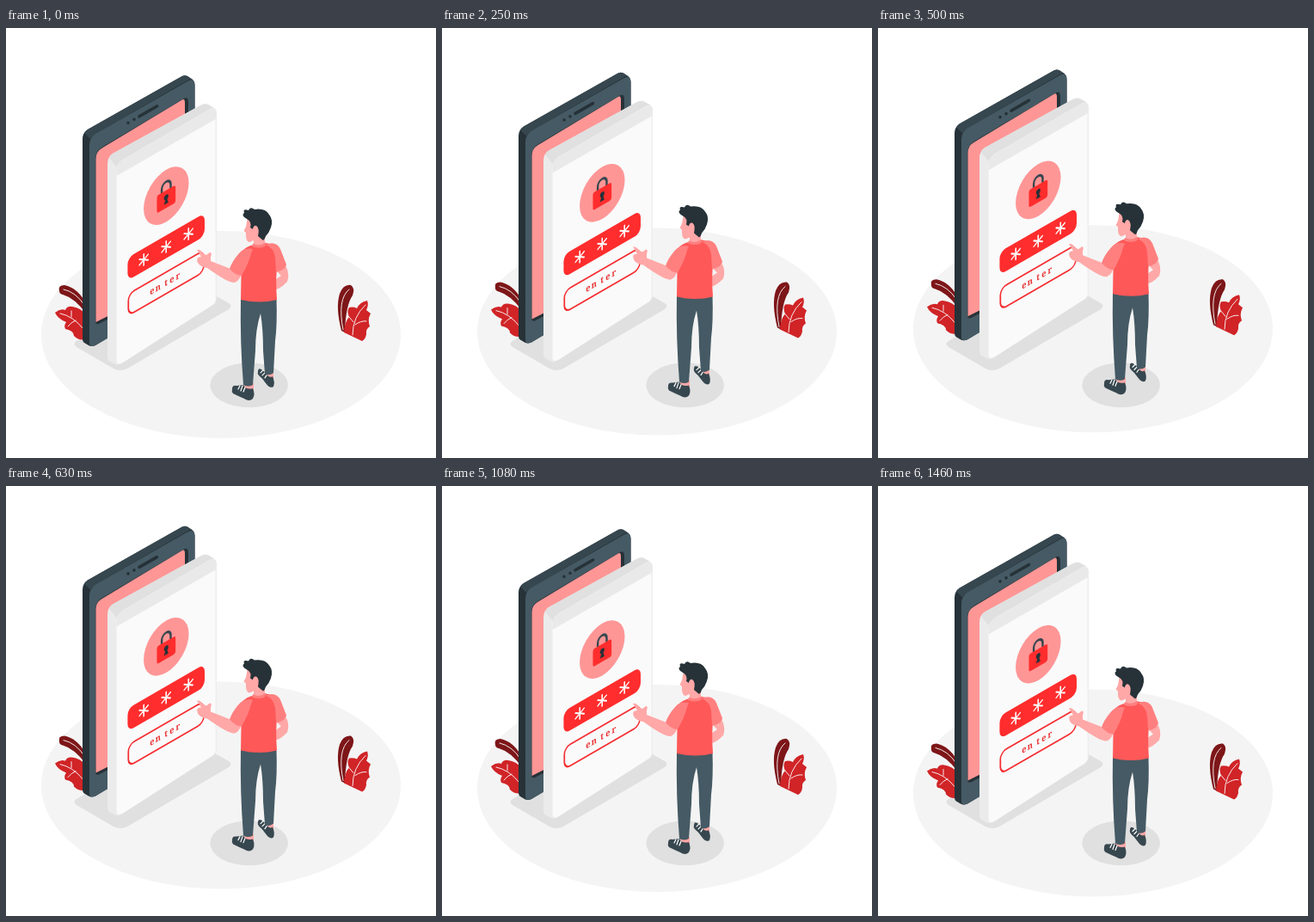
Recreate the animation shown at these times as an HTML page. Size 500 px wide and 500 px high, loop 1500 ms.

```html
<!DOCTYPE html>
<html lang="en">
<head>
<meta charset="utf-8">
<title>Enter password</title>
<style>
  html, body { margin: 0; height: 100%; overflow: hidden; background: #fff; }
  svg { display: block; width: 100vw; height: 100vh; }
  .dark { fill: #263238; }
  .shade { fill: #37474f; }
  .slate { fill: #455a64; }
  .pink { fill: #ff9696; }
  .skin { fill: #ffa8a7; }
  .red { fill: #ff2d2d; }
  .sleeve { fill: #ff7f7f; }
  .shadow { fill: #e0e0e0; }
  .maroon { fill: #7d1618; }
  .leaf { fill: #d02427; }
  .line { fill: none; stroke: #fff; stroke-linecap: round; stroke-linejoin: round; }
</style>
</head>
<body>
<svg viewBox="0 0 500 500">
  <defs>
    <path id="star" class="line" stroke-width="1.8" d="M0-6.500V6.500M-5.800-3.300L5.800 3.300M-5.800 3.300L5.800-3.300"/>
  </defs>

  <ellipse class="float" cx="250" cy="356.5" rx="209" ry="120.5" fill="#f4f4f4"/>

  <path class="shadow" d="M82 364L200 295Q208 291 215 295L259 320Q264 323 259 327L141 396Q133 400 125 396L82 371Q77 367 82 364Z"/>
  <ellipse class="shadow" cx="282.7" cy="415.3" rx="45.3" ry="26"/>

  <g class="float">
    <g id="plants">
      <path class="maroon" d="M62 306Q60 299 68 299Q83 302 93 320V332Q80 314 66 310Q62 309 62 306Z"/>
      <path class="line" stroke-width=".9" d="M67 304Q81 307 91 322"/>
      <path class="leaf" d="M57 331Q63 326 69 328Q71 323 77 324Q86 325 93 333V362Q85 364 79 358Q79 352 69 350Q67 346 70 342Q60 338 57 331Z"/>
      <path class="line" stroke-width=".9" d="M63 332Q78 335 90 350M76 336L76 329M81 340Q76 342 72 347"/>
      <path class="maroon" d="M390 352Q383 325 388 309Q392 298 401 299Q406 302 403 311Q395 322 394 354Z"/>
      <path class="line" stroke-width=".9" d="M399 304Q385 315 392 351"/>
      <path class="leaf" d="M393 354Q394 341 399 336Q396 329 399 325Q404 324 408 326Q411 319 420 317Q422 322 419 328L424 332Q420 339 423 347Q418 350 419 356Q418 362 414 364Z"/>
      <path class="line" stroke-width=".9" d="M403 357Q403 336 418 322M404 342L399 336M406 345Q413 340 419 341"/>
    </g>

    <g id="phone">
      <path class="dark" d="M89 129Q89 122 95 118L203 57Q207 54 211 56L217 60Q219.500 62 219.500 67V300L104 369Q99 371 96 369L91 366Q89 365 89 361Z"/>
      <path class="shade" d="M91 122Q93 119 95 118L203 57Q207 54 211 56L217 60Q214 59 211 61L104 123Q100 126 98 129Z"/>
      <path class="slate" d="M97 136Q97 128 104 123L211 62Q219.500 57 219.500 67V300L104 369Q97 372 97 366Z"/>
      <path class="dark" d="M104 152Q104 144 111 139L207 82Q212 79 212 87V290L108 344Q104 345 104 341Z"/>
      <path class="pink" d="M104.500 152Q104.500 144 111 140L204 84Q208 81 208 87V290L104.500 342Z"/>
      <path class="line" style="stroke:#263238" stroke-width="3.600" d="M142 110.300v.1M149 106.300v.1M155 102.800L175.500 91"/>
    </g>

    <g id="panel">
      <path fill="#ebebeb" d="M118 158Q118 150 124 146L226 90Q231 87 235 89L242 93Q245 95 245 99V314Q245 319 241 322L136 389Q130 393 127 391L121 388Q118 386 118 382Z"/>
      <path fill="#e0e0e0" d="M120 151Q121 148 124 146L226 90Q231 87 235 89L242 93Q239 93 236 95L136 153Q131 156 129 162Z"/>
      <path fill="#fafafa" d="M128.500 167Q128.500 158 136 153L236 95Q244 91 244 99V314Q244 319 240 322L136 389Q128.500 393 128.500 386Z"/>
      <path fill="#e9e9e9" d="M128.500 172V167Q128.500 158 136 153L236 95Q244.500 91 244.500 99V105.500Z"/>
      <path fill="none" stroke="#eee" stroke-width="1.500" d="M244.200 105V314"/>
      <g transform="matrix(.866 -.5 0 1 186.300 195.200)">
        <circle class="pink" r="30.300"/>
        <g transform="translate(0 3.700)">
          <path fill="none" stroke="#37474f" stroke-width="2.800" d="M-6-9V-14.200A6 6 0 0 1 6-14.200V-9"/>
          <rect class="red" x="-12.500" y="-10" width="25" height="20.500" rx="2.500"/>
          <circle class="dark" cy="-2" r="3"/>
          <path class="dark" d="M-1 0H1L3 5.500H-3Z"/>
        </g>
      </g>
      <g transform="matrix(.866 -.5 0 1 186.200 254.500)">
        <rect class="red" x="-51.700" y="-13.300" width="103.400" height="26.600" rx="8"/>
        <use href="#star" x="-30"/><use href="#star"/><use href="#star" x="30"/>
      </g>
      <g transform="matrix(.866 -.5 0 1 186.200 296.500)">
        <rect x="-50.700" y="-12.500" width="101.400" height="25" rx="8" fill="#fafafa" stroke="#f52d31" stroke-width="2"/>
        <text x="-22 -14.300 -8 -2.200 4.800 13.200" y="3.300" font-family="'Noto Serif', serif" font-weight="700" font-size="10.500" fill="#e8302f">en ter</text>
      </g>
    </g>

    <g id="man">
      <path class="skin" d="M277 413H288V422H277ZM301 400H311V409H301Z"/>
      <path class="shade" d="M263 420Q263 415 268 416L276 415Q279 421 287 419Q290 426 287 431Q283 435 277 431Q270 428 264 425Q262 423 263 420ZM293 399Q293 395 297 397L302 401Q306 408 310 405Q313 412 311 417Q307 420 302 413Q298 407 294 404Q292 402 293 399Z"/>
      <path class="line" stroke-width="1.200" d="M272 416L270 420M275 416L273 422M278 418L276 423M299 398L296 401M301 401L298 404M303 404L301 407"/>
      <path class="slate" d="M273 314H314.500Q315.500 345 313 364L311 401Q306 405 301 402L299 375Q299 350 296 332Q290 350 290 375L287 415Q282 418 276 415Q272 365 273 314Z"/>
      <path class="skin" d="M315 283L326 278Q330 287 327 295Q319 303 314 304L313 299Q311 296 314 292L320 288Z"/>
      <path fill="#ff5858" d="M274 260Q279 254 288 252L301 250Q312 251 316 257V270Q313 290 315 316Q295 321 273 316Z"/>
      <path class="sleeve" d="M302 252Q314 247 319 257L326 275Q326 281 314 284L313 267Q312 256 302 252Z"/>
      <path class="skin" d="M222 258Q226 257 229 262L233 264L237 261Q240 261 238 266L238 271L261 280L274 283Q273 293 266 296Q259 297 234 279Q226 278 223 273Q220 266 227 266Q224 261 222 258Z"/>
      <path class="sleeve" d="M287 257Q277 255 271 262Q263 271 260 280Q267 288 274 288Q283 272 285 262Z"/>
      <path class="sleeve" d="M287 251Q295 247 303 250L301 254Q294 257 286 254Z"/>
      <path class="skin" d="M281 220L279 231L276.500 236L279 238V241Q279 248 283 249L288 247V251Q294 254 301 250V238L296 222Z"/>
      <path class="dark" d="M277 220Q274 217 277 215Q275 210 282 212Q284 207 289 211Q301 209 306 217Q311 223 308 232Q306 238 302 242Q301 246 299 247L293 242Q295 233 291 230Q288 229 287 234L284 232Q286 225 280 222Z"/>
      <path class="skin" d="M287 235Q288 229 292 231Q295 235 291 240Q288 241 287 235Z"/>
    </g>
  </g>
</svg>
<script>
  const PERIOD = 1500, STEPS = 36, LIFT = 10, REST = .5;
  const floating = document.querySelectorAll('.float');

  // The scene rises and sinks at a constant speed, in 24 steps per second.
  function draw() {
    const step = Math.floor(performance.now() % PERIOD / PERIOD * STEPS);
    const phase = (step + 1) / STEPS;
    const rise = LIFT * (1 - Math.abs(2 * phase - 1));
    for (const part of floating) part.setAttribute('transform', `translate(0 ${REST - rise})`);
    requestAnimationFrame(draw);
  }
  draw();
</script>
</body>
</html>
```
